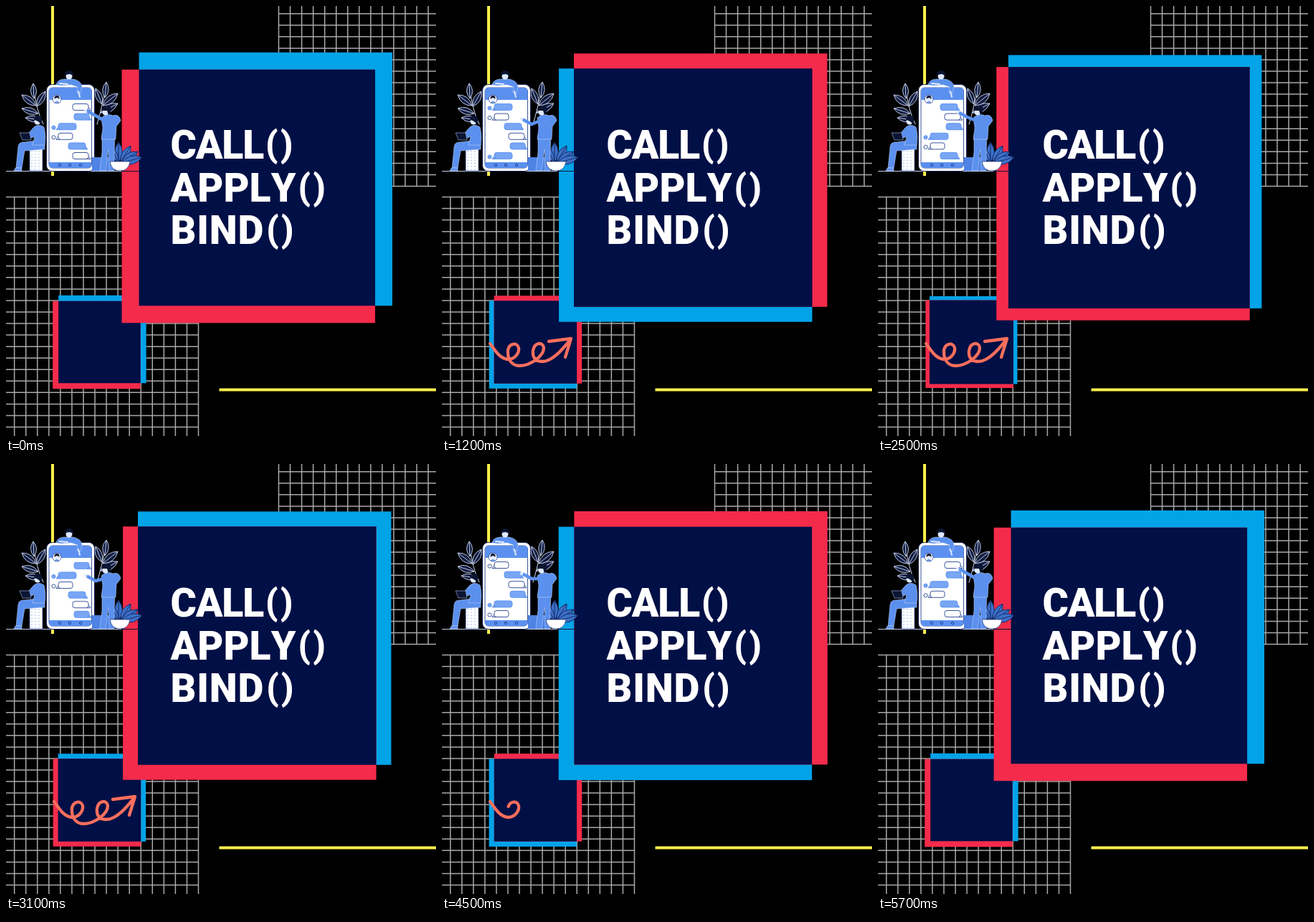
These frames come from a looping animation (600x600 px, 5800 ms). An HTML page:

```html
<!DOCTYPE html>
<html lang="en">
<head>
<meta charset="utf-8">
<title>call, apply, bind</title>
<style>
  html, body { margin: 0; width: 100%; height: 100%; overflow: hidden; background: #000; }
  svg { display: block; width: 100vw; height: 100vh; }
  .title { font: 900 55.5px Roboto, "Open Sans", sans-serif; font-kerning: none; fill: #fff; }
  .parens { font-size: 50px; letter-spacing: 3px; }
  .red { fill: #f42b4b; }
  .blue { fill: #03a3e8; }
  .navy { fill: #000f45; }
  .line { fill: none; stroke-linecap: round; stroke-linejoin: round; }
  .body { fill: #5b90ee; stroke: #c9dafb; stroke-width: .5; stroke-linejoin: round; }
  .dark { fill: #0b1533; }
  .skin { fill: #dfe9ff; }
</style>
</head>
<body>
<svg viewBox="0 0 600 600">
  <defs>
    <clipPath id="chatArea"><rect x="60" y="136" width="60" height="80"/></clipPath>
  </defs>
  <path id="grid" fill="none" stroke="#a9a9a9" stroke-width="1.5"/>
  <path d="M65 0V237M297.500 535.500H600" stroke="#fdf04c" stroke-width="4"/>

  <g id="small"></g>
  <path id="scribble" class="line" stroke="#f96f5d" stroke-width="4.300"
    d="M67 471C73 479 80 492 92 493C102 493 108 484 107 477C105 469 94 470 92 480C91 494 98 502 108 502C124 502 142 488 142 477C141 468 129 469 127 481C126 491 131 496 140 496C154 496 168 480 180 464L172 490L180 464L149 468"/>
  <g id="big"></g>
  <g id="lines" class="title"></g>

  <g id="scene">
    <path d="M0 230.500H161" stroke="#c3cfec" stroke-width="1"/>
    <path d="M161 230.500H186" stroke="#0b1533" stroke-width="1"/>
    <g id="plants"></g>

    <!-- phone -->
    <rect x="56.500" y="109.500" width="67" height="121" rx="8" fill="#fff" stroke="#16245a"/>
    <rect x="60" y="114" width="59.500" height="112" rx="5" fill="#fff" stroke="#27438f" stroke-width=".9"/>
    <path d="M60 131V119Q60 114 65 114H114.500Q119.500 114 119.500 119V131Z" fill="#5b90ef"/>
    <path d="M60 218H119.500V221Q119.500 226 114.500 226H65Q60 226 60 221Z" fill="#5b90ef"/>
    <g fill="none" stroke="#1d3a86" stroke-width=".9">
      <circle cx="75" cy="222" r="1.700"/><circle cx="89" cy="222" r="1.700"/><circle cx="104" cy="222" r="1.700"/>
    </g>
    <g clip-path="url(#chatArea)"><g id="chat"></g></g>
    <circle cx="71" cy="130" r="6" fill="#fff" stroke="#27438f" stroke-width=".8"/>
    <circle cx="71" cy="130" r="3" fill="#dfe9ff"/>
    <path class="dark" d="M67.500 130Q67 125 71 125T74.500 130Q71 126 67.500 130Z"/>
    <path d="M67 135Q71 131 75 135Z" fill="#5b90ef"/>

    <!-- leaning over the top -->
    <path class="body" d="M70 110Q72 102 82 102L94 102Q104 104 106 112L104 122L99 121L100 113L91 110L77 111Z"/>
    <circle class="skin" cx="88" cy="98" r="4.500"/>
    <path class="dark" d="M82 97Q82 90 88 90T94 97L89 95Q85 95 82 97Z"/>
    <path class="line" d="M75 108L86 109M101 119L103 127" stroke="#dfe9ff" stroke-width="2"/>

    <!-- seated -->
    <rect x="33" y="194" width="18" height="36" fill="#fff" stroke="#27438f" stroke-width=".7"/>
    <path d="M36 198V230M41 198V230M46 198V230" stroke="#8ba7df" stroke-width="1.200" stroke-dasharray="1.200 3"/>
    <path class="body" d="M54 192L54 200L26 202L22 226L14 226L17 196Q18 189 26 190L42 188Z"/>
    <path class="body" d="M38 170Q45 163 53 169Q56 180 54 194L37 194L40 182L29 187L26 184Z"/>
    <path d="M13 226H22V230H11Z" class="body"/>
    <circle class="skin" cx="44" cy="161" r="4.500"/>
    <path class="dark" d="M39 159Q39 153 45 153T50 160L49 166Q46 160 39 159Z"/>
    <path class="dark" d="M19 177H33L35 187H23Z" stroke="#a9bfec" stroke-width=".6"/>

    <!-- standing -->
    <rect x="120" y="211" width="24" height="19" fill="#4f83e4"/>
    <path class="body" d="M134 180H152L151 205L151 230H144L143 200L139 230H131L134 204Z"/>
    <path class="body" d="M133 156Q141 149 149 153Q158 150 160 160L154 168L153 186H133L135 170Z"/>
    <circle class="skin" cx="139" cy="148" r="4.500"/>
    <path class="dark" d="M134 146Q134 139 141 139T146 147L143 152L141 146Z"/>
    <path id="arm" class="line" stroke="#5b90ee" stroke-width="4.500"/>
    <circle id="hand" class="skin" r="2.200"/>

    <!-- pot -->
    <path d="M145 217H173Q171 230 159 230T145 217Z" fill="#fff" stroke="#27438f" stroke-width=".8"/>
  </g>
</svg>
<script>
const LOOP = 5800, STEP = 100, SWING = 2866, CYCLE = 2900, ROW = 13.6;
const $ = id => document.getElementById(id);

function set(el, attrs) {
  for (const k in attrs) el.setAttribute(k, attrs[k]);
}
function add(parent, tag, attrs, text) {
  const el = document.createElementNS("http://www.w3.org/2000/svg", tag);
  set(el, attrs);
  if (text) el.textContent = text;
  return parent.appendChild(el);
}

// Grid patches
const CELL = 16.05;
let grid = "";
for (let x = 380.5; x < 600; x += CELL) grid += `M${x} 0V252`;
for (let y = 251.5; y > 0; y -= CELL) grid += `M380 ${y}H600`;
for (let x = 268.5; x > 0; x -= CELL) grid += `M${x} 266V600`;
for (let y = 266.5; y < 600; y += CELL) grid += `M0 ${y}H269`;
$("grid").setAttribute("d", grid);

// Two offset squares with a navy overlap
function makePair(id, cx, cy, size, reach) {
  const g = $(id);
  const [blue, red, navy] = ["blue", "red", "navy"].map(c =>
    add(g, "rect", { class: c, width: size, height: size }));
  const x0 = cx - size / 2, y0 = cy - size / 2;
  return swing => {
    const d = reach * swing, a = Math.abs(d);
    set(blue, { x: x0 + d, y: y0 - d });
    set(red, { x: x0 - d, y: y0 + d });
    set(navy, { x: x0 + a, y: y0 + a, width: size - 2 * a, height: size - 2 * a });
  };
}
const pairs = [
  makePair("small", 130.4, 469, 122.5, 4),
  makePair("big", 350.3, 253.5, 353.5, 12)
];

[["CALL", -1.2], ["APPLY", 0], ["BIND", 0.8]].forEach(([word, gap], i) => {
  const line = add($("lines"), "text", { x: 229.5, y: 213 + 59.5 * i });
  add(line, "tspan", { "letter-spacing": gap }, word);
  add(line, "tspan", { class: "parens", dx: 3, dy: -3 }, "()");
});

// Leaves: base x, base y, tip x, tip y
function leaves(list, fill, stroke) {
  for (const [x, y, tx, ty] of list) {
    const mx = (x + tx) / 2, my = (y + ty) / 2;
    const nx = (ty - y) * 0.38, ny = (x - tx) * 0.38;
    add($("plants"), "path", {
      d: `M${x} ${y}Q${mx + nx} ${my + ny} ${tx} ${ty}Q${mx - nx} ${my - ny} ${x} ${y}L${tx} ${ty}`,
      fill, stroke, "stroke-width": 0.9
    });
  }
}
add($("plants"), "path", { class: "line", d: "M52 165Q42 145 39 115M127 165Q133 145 140 112", stroke: "#cfdcf8" });
leaves([[39, 129, 38, 108], [42, 139, 22, 124], [43, 140, 55, 119], [45, 150, 22, 143], [49, 159, 27, 156]], "#131d40", "#cfdcf8");
leaves([[138, 128, 140, 106], [135, 139, 156, 122], [134, 137, 125, 115], [132, 149, 156, 136]], "#131d40", "#cfdcf8");
leaves([[157, 218, 157, 190], [156, 218, 147, 198], [160, 218, 174, 195], [161, 218, 184, 203], [161, 219, 190, 211]], "#3d70c9", "#14265c");

// Chat bubbles: x, width, filled, from the left side
const KINDS = [[87, 24, 1, 0], [93, 22, 0, 0], [95, 21, 1, 0], [73, 25, 1, 1], [73, 20, 0, 1]];
for (let k = 0; k < 14; k++) {
  const [x, w, full, left] = KINDS[k % 5], y = 136.5 + ROW * k;
  const style = { fill: full ? "#78a6f5" : "#fff", stroke: full ? "#5b90ef" : "#27438f", "stroke-width": 0.9 };
  const tail = left ? `M${x + 3} ${y + 9}H${x - 3}L${x} ${y + 5}` : `M${x + w - 3} ${y + 9}H${x + w + 3}L${x + w} ${y + 5}`;
  add($("chat"), "path", { d: tail, ...style });
  add($("chat"), "rect", { x, y, width: w, height: 9, rx: 3, ...style });
  if (left) add($("chat"), "circle", { cx: 66.5, cy: y + 6, r: 2.6, ...style });
}

const clamp = v => Math.min(1, Math.max(0, v));
const ease = v => v * v * (3 - 2 * v);

const SHIFTS = [30, 700, 1300, 2030, 2500];
const scrollAt = t => SHIFTS.reduce((sum, s) => sum + ease(clamp((t - s) / 200)), 1);

const HAND = [[0, 146], [200, 156], [1000, 158], [1200, 158], [1600, 153], [2000, 152], [2800, 146], [2900, 146]];
function handAt(t) {
  const i = HAND.findIndex(p => p[0] > t);
  const [t0, y0] = HAND[i - 1], [t1, y1] = HAND[i];
  return y0 + (y1 - y0) * (t - t0) / (t1 - t0);
}

const scribble = $("scribble"), total = scribble.getTotalLength();

function draw(t) {
  const swing = Math.cos(2 * Math.PI * t / SWING);
  pairs.forEach(move => move(swing));

  const shown = clamp(Math.min((t - 100) / 1000, (4730 - t) / 1000));
  scribble.style.visibility = shown ? "visible" : "hidden";
  scribble.setAttribute("stroke-dasharray", `${total * shown} ${total + 10}`);

  const c = t % CYCLE, hy = handAt(c);
  $("chat").setAttribute("transform", `translate(0 ${-ROW * scrollAt(c)})`);
  $("arm").setAttribute("d", `M137 160L125 ${hy + 7}L114 ${hy + 1}`);
  set($("hand"), { cx: 111, cy: hy });
}

const start = performance.now();
function tick() {
  const t = (performance.now() - start) % LOOP;
  draw(Math.floor(t / STEP) * STEP);
  requestAnimationFrame(tick);
}
draw(0);
requestAnimationFrame(tick);
</script>
</body>
</html>
```
